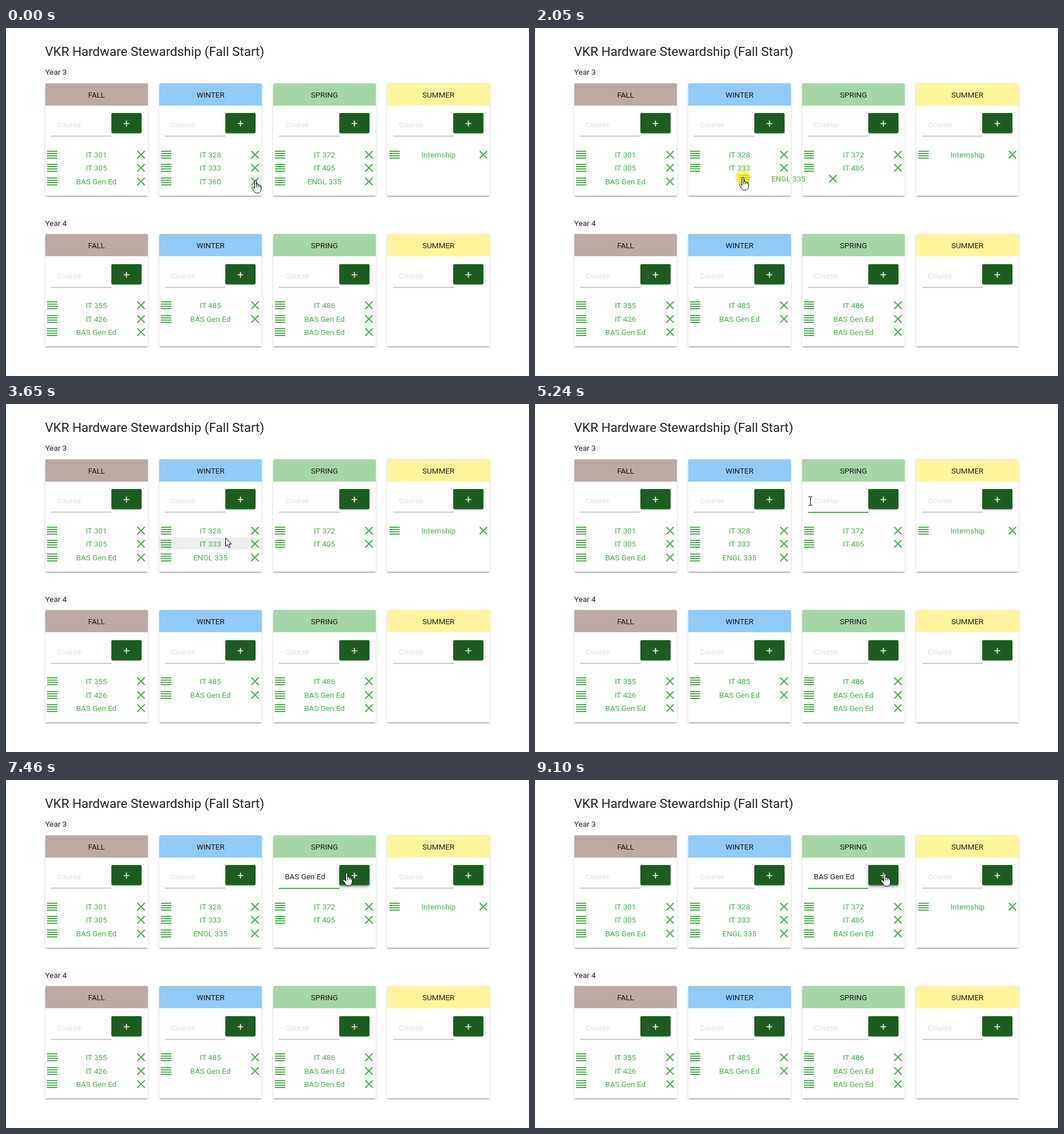
Animation of 918x610 px, one loop 9.56 s. Source, as an HTML page:

```html
<!DOCTYPE html>
<html lang="en">
<head>
<meta charset="utf-8">
<title>Course planner</title>
<style>
html, body { margin: 0; width: 100%; height: 100%; overflow: hidden; background: #fff; }
body { position: relative; font: 13.5px/20px Roboto, sans-serif; color: rgba(0,0,0,.87); }
div, svg { position: absolute; white-space: pre; }
svg { overflow: visible; }
.title { font-size: 22.5px; line-height: 30px; }
.card, .btn { border-radius: 2px; box-shadow: 0 2px 2px rgba(0,0,0,.14), 0 1px 5px rgba(0,0,0,.12), 0 3px 1px -2px rgba(0,0,0,.2); }
.card { width: 180px; height: 197px; background: #fff; }
.head { width: 180px; height: 39px; line-height: 41px; text-align: center; border-radius: 2px 2px 0 0; }
.hint { color: #e2e2e2; }
.line { width: 106px; height: 1px; background: #9e9e9e; }
.btn { width: 53px; height: 35px; background: #1b5e20; overflow: hidden; }
.btn.over { box-shadow: 0 3px 3px rgba(0,0,0,.14), 0 1px 7px rgba(0,0,0,.12), 0 3px 1px -1px rgba(0,0,0,.2), 0 4px 10px rgba(0,0,0,.15); }
.row { width: 180px; height: 20px; color: #4caf50; text-align: center; }
.hover { background: #eee; }
.ripple { width: 100px; height: 100px; border-radius: 50%; background: #fff; }
.list { width: 104px; height: 20px; border: 1px solid #bbb; background: #fff; text-indent: 9px; }
.spot { width: 26px; height: 26px; border-radius: 50%; background: rgba(255,235,0,.65); }
</style>
</head>
<body>
<script>
const LOOP = 9560;

function add(cls, x, y, html = '', parent = document.body) {
  const el = document.createElement('div');
  el.className = cls;
  el.innerHTML = html;
  el.style.left = x + 'px';
  el.style.top = y + 'px';
  parent.append(el);
  return el;
}
const svg = (x, y, body, size = 24) =>
  `<svg style="left:${x}px;top:${y}px" width="${size}" height="${size}">${body}</svg>`;
const show = (el, on) => { el.style.visibility = on ? 'visible' : 'hidden'; };
const move = (el, x, y) => { el.style.transform = `translate(${x}px,${y}px)`; };
const clamp = v => Math.max(0, Math.min(1, v));
const within = (t, a, b) => t >= a && t < b;

const PLUS = svg(21, 13, '<path d="M5.5 .5v10M.5 5.5h10" stroke="#fff" stroke-width="1.7"/>', 11);
const BARS = svg(.4, -2, '<path d="M3 6h18M3 10h18M3 14h18M3 18h18" stroke="#4caf50" stroke-width="2"/>');
const CROSS = svg(156.4, -2, '<path d="M5.5 5.5l13 13M18.5 5.5l-13 13" stroke="#4caf50" stroke-width="2"/>');

const seasons = [['FALL', '#bcaaa4'], ['WINTER', '#90caf9'], ['SPRING', '#a5d6a7'], ['SUMMER', '#fff59d']];
const GEN = 'BAS Gen Ed';
const years = [
  [['IT 301', 'IT 305', GEN], ['IT 328', 'IT 333', 'IT 360'], ['IT 372', 'IT 405', 'ENGL 335'], ['Internship']],
  [['IT 355', 'IT 426', GEN], ['IT 485', GEN], ['IT 486', GEN, GEN], []]
];
const left = col => 68.6 + 200.2 * col;

function addRow(col, i, dy, name) {
  return add('row', left(col), 211.5 + 23.5 * i + dy, `${BARS}<div style="width:180px">${name}</div>${CROSS}`);
}

add('title', 68.5, 26, 'VKR Hardware Stewardship (Fall Start)');
const parts = {};
years.forEach((cols, y) => {
  const dy = 264.5 * y;
  add('', 68.8, 67 + dy, 'Year ' + (y + 3));
  seasons.forEach(([name, color], c) => {
    const x = left(c), at = (cls, dx, top, html) => add(cls, Math.round(x + dx), Math.round(top + dy), html);
    at('card', 0, 96.8);
    at('head', 0, 96.8, name).style.background = color;
    const hint = add('hint', x + 20.4, 159 + dy, 'Course');
    const line = at('line', 10.4, 189);
    const btn = at('btn', 116.2, 149.4, PLUS);
    parts[y + '' + c] = { hint, line, btn };
  });
});

const hover = add('hover', 0, 0);
const rows = years.map((cols, y) => cols.map((names, c) => names.map((n, i) => addRow(c, i, 264.5 * y, n))));
const removed = rows[0][1][2], dragged = rows[0][2][2];
const added = addRow(2, 2, 0, GEN);
const { hint, line, btn } = parts['02'];
const ripple = add('ripple', -23, -34, '', btn);
const typed = add('', 489.4, 159);
const caret = add('', 490, 160);
caret.style.cssText += 'width:1px;height:18px;background:#222';
const list = add('list', 479, 191, GEN);
const spot = add('spot', -13, -13);

// Each pointer has its hot spot at 0,0
const pointers = {
  hand: '<path d="M-1.6 1.2C-1.6-.5 1.6-.5 1.6 1.2V8C2-.0 2 6.9 3.2 6.9 4.4 6.9 4.8 7.8 4.8 8.6 5.4 7.4 7.6 7.8 7.8 9.6 8.6 8.6 9.8 9.2 9.8 11V15.5C9.8 19 7.6 22.2 4 22.2H2C-.8 22.2-2 20-3 18.3L-6.3 13.7C-7.2 11.8-5 10.4-3.4 12L-1.6 14Z" fill="#fff" stroke="#000"/><path d="M1.6 8v4M4.8 8.6V12M7.8 9.6V12" stroke="#000" fill="none"/>',
  arrow: '<path d="M.5.7V15.5L4 12.4 6.3 17.8 8.6 16.8 6.3 11.5H10.7Z" fill="#fff" stroke="#000"/>',
  beam: '<path d="M-3-7.5H-1Q.5-7.5.5-6V6Q.5 7.5-1 7.5H-3M4-7.5H2Q.5-7.5.5-6M.5 6Q.5 7.5 2 7.5H4" fill="none" stroke="#000"/>'
};
for (const k in pointers) pointers[k] = add('', 0, 0, svg(0, 0, pointers[k]));

// time, x, y of the pointer
const path = [
  [0, 438, 267], [700, 438, 267], [1000, 471, 267], [1150, 477, 267], [1480, 479, 267], [1680, 479, 267],
  [1850, 430, 265], [2050, 365, 262], [2300, 306, 257], [2580, 296, 254], [3500, 296, 254], [3650, 385, 234],
  [3900, 440, 205], [4200, 477, 176], [4440, 483, 170], [6750, 483, 170], [7100, 520, 168], [7460, 598, 163],
  [7700, 614, 163.5], [LOOP, 614, 163.5]
];
function pointerAt(t) {
  const i = path.findIndex(p => p[0] > t), a = path[i - 1], b = path[i];
  const k = (t - a[0]) / (b[0] - a[0]);
  return [a[1] + (b[1] - a[1]) * k, a[2] + (b[2] - a[2]) * k];
}

function pointerKind(t, x) {
  if (t < 610) return 'hand';
  if (t < 1480) return x < 469 ? 'arrow' : 'hand';
  if (t < 3190) return 'hand';
  if (t < 6700) return x < 479 ? 'arrow' : 'beam';
  return x < 585 ? 'beam' : 'hand';
}

// x, y, width, height of the grey hover area
function hoverBox(t, x, y) {
  if (t < 610) return [425, 257, 24, 23];
  if (t < 1680) return x >= 469 ? [469, 257, 24, 23] : null;
  if (!within(t, 3190, 4440) || x > 449) return null;
  if (y >= 233) return [269, 234, 180, 21];
  return within(y, 211, 233) ? [269, 211, 180, 21] : null;
}

const clicks = [[560, 760], [1630, 2630], [4720, 4920], [7820, 8020]];

function draw(t) {
  const [x, y] = pointerAt(t), kind = pointerKind(t, x);
  for (const k in pointers) {
    show(pointers[k], k === kind);
    move(pointers[k], Math.round(x), Math.round(y));
  }
  show(spot, clicks.some(c => within(t, ...c)));
  move(spot, x, y);

  const box = hoverBox(t, x, y);
  show(hover, box);
  if (box) ['left', 'top', 'width', 'height'].forEach((k, i) => { hover.style[k] = box[i] + 'px'; });

  show(removed, t < 610);
  show(added, t >= 7870);

  // the dragged row follows the pointer, then glides into its slot
  const grab = t < 1630 ? [0, 0] : pointerAt(Math.min(t, 2580)).map((v, i) => v - [479, 267][i]);
  const k = clamp((t - 2580) / 280), settle = k * (2 - k);
  move(dragged, grab[0] + (-200.2 - grab[0]) * settle, grab[1] * (1 - settle));

  const text = t < 5700 ? '' : t < 6030 ? 'B' : GEN;
  typed.textContent = text;
  show(hint, !text);
  show(list, within(t, 5700, 6030));
  list.style.background = t >= 5800 ? '#e4e4e4' : '#fff';
  show(caret, within(t, 4720, 5240) || within(t, 5700, 6290) || within(t, 6820, 7350));
  move(caret, text === GEN ? 71 : text ? 8 : 0, 0);

  const focus = clamp((t - 4720) / 200);
  line.style.background = focus ? `color-mix(in srgb, #4caf50 ${focus * 100}%, #9e9e9e)` : '#9e9e9e';
  line.style.boxShadow = focus ? `0 1px rgba(76,175,80,${focus})` : 'none';

  btn.classList.toggle('over', x >= 585);
  const wave = clamp((t - 7820) / 700);
  ripple.style.opacity = .35 * (1 - wave);
  ripple.style.transform = `scale(${wave * (2 - wave)})`;
}

function tick() {
  draw(performance.now() % LOOP);
  requestAnimationFrame(tick);
}
tick();
</script>
</body>
</html>
```
